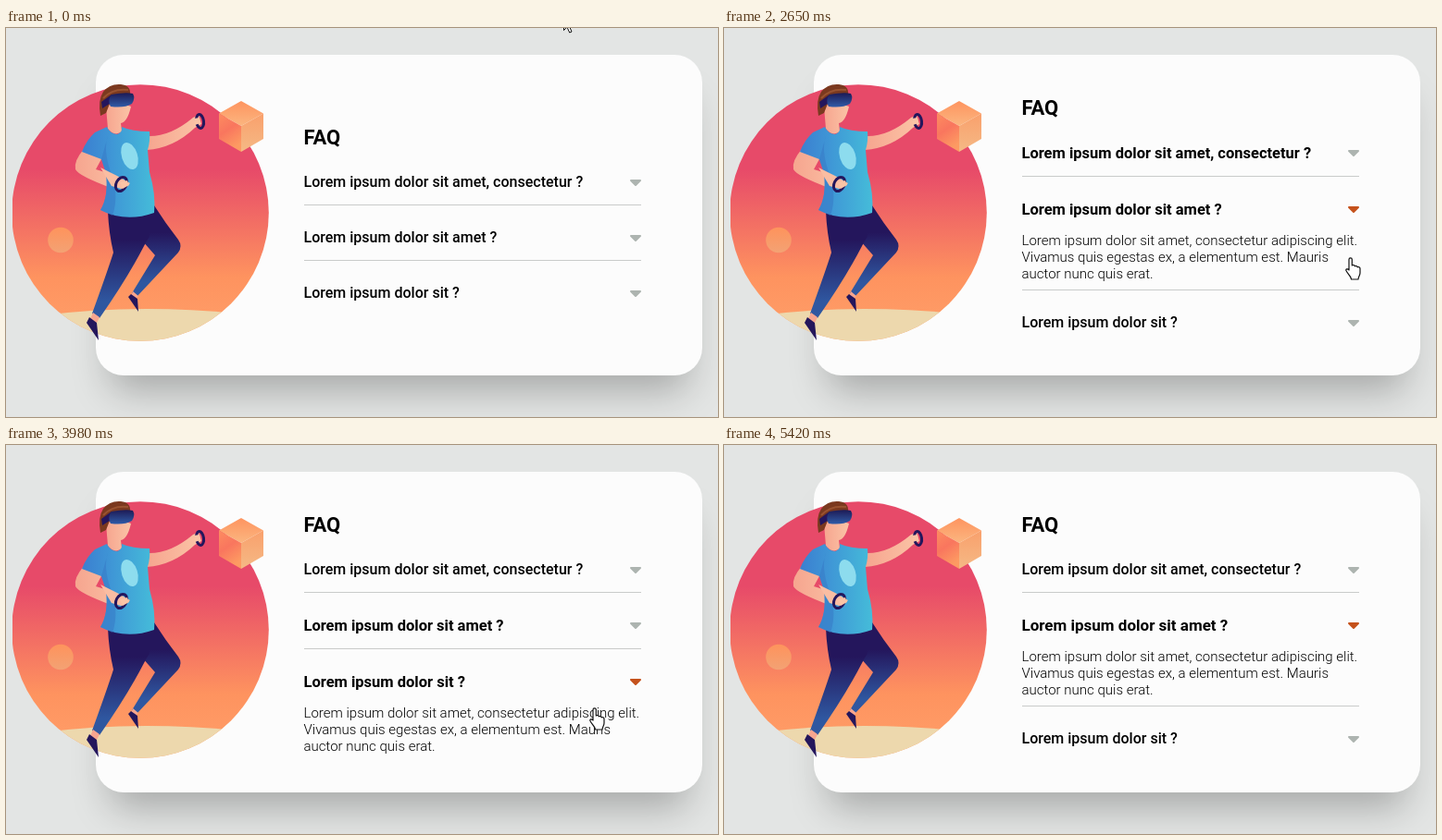
An HTML page that plays this animation: 769 by 421 pixels, repeating every 5620 ms.

```html
<!DOCTYPE html>
<html lang="en">
<head>
<meta charset="utf-8">
<title>FAQ</title>
<style>
  html, body { margin: 0; width: 100%; height: 100%; overflow: hidden; background: #e3e5e4; }
  body { position: relative; }
  .card { position: absolute; left: 97px; top: 29px; width: 655px; height: 347px; border-radius: 30px;
    background: #fcfcfc; box-shadow: 0 32px 42px -16px rgba(0, 0, 0, .27); }
  svg { position: absolute; left: 0; top: 0; display: block; }
  text { font-family: Roboto, "Open Sans", sans-serif; white-space: pre; }
  .title { font-size: 22px; font-weight: 700; }
  .answer { font-size: 15px; font-weight: 300; }
</style>
</head>
<body>
<div class="card"></div>
<svg width="769" height="421" viewBox="0 0 769 421">
  <defs>
    <linearGradient id="sky" x2="0" y2="1">
      <stop offset=".33" stop-color="#e74a69"/><stop offset=".75" stop-color="#fe935f"/><stop offset="1" stop-color="#ffa06a"/>
    </linearGradient>
    <linearGradient id="ball" x2="0" y2="1"><stop stop-color="#fe935c"/><stop offset="1" stop-color="#f3a274"/></linearGradient>
    <linearGradient id="cubeTop" x2="0" y2="1"><stop stop-color="#fe945f"/><stop offset="1" stop-color="#fbb680"/></linearGradient>
    <linearGradient id="cubeLeft" x2=".4" y2="1"><stop stop-color="#fd8c60"/><stop offset=".5" stop-color="#f9765e"/><stop offset="1" stop-color="#fd9a62"/></linearGradient>
    <linearGradient id="cubeRight" x2="0" y2="1"><stop stop-color="#f9a06c"/><stop offset="1" stop-color="#f5b985"/></linearGradient>
    <linearGradient id="shirt"><stop stop-color="#3b7fd0"/><stop offset=".42" stop-color="#3f97d6"/><stop offset="1" stop-color="#45bcd9"/></linearGradient>
    <linearGradient id="pants" x2="0" y2="1"><stop offset=".3" stop-color="#24165c"/><stop offset=".85" stop-color="#2f57a0"/></linearGradient>
    <linearGradient id="visor" x2="0" y2="1"><stop stop-color="#1d1a55"/><stop offset="1" stop-color="#305ca8"/></linearGradient>
    <linearGradient id="skin"><stop stop-color="#f6a58f"/><stop offset="1" stop-color="#fbc4a6"/></linearGradient>
    <clipPath id="left"><path d="M7 50H300V350H7z"/></clipPath>
    <clipPath id="disc"><circle cx="145" cy="200" r="138.800"/></clipPath>
  </defs>

  <g clip-path="url(#left)">
    <circle cx="145" cy="200" r="138.800" fill="url(#sky)"/>
    <path d="M40 311Q140 298 250 309V345H40z" fill="#edd8ad" clip-path="url(#disc)"/>
  </g>
  <circle cx="59" cy="229.500" r="13.800" fill="url(#ball)"/>
  <path d="M254 79L278 92.500L254 106L230 92.500z" fill="url(#cubeTop)"/>
  <path d="M230 92.500L254 106V134L230 120z" fill="url(#cubeLeft)"/>
  <path d="M278 92.500L254 106V134L278 120z" fill="url(#cubeRight)"/>

  <g id="player">
    <path d="M160 192Q172 211 186 229Q191 236 186 243L142 290L136 287L161 246L140 222z" fill="url(#pants)"/>
    <path d="M110 198L161 193Q161 218 149 236Q131 271 101 314L93 309Q110 262 116 243Q111 222 110 198z" fill="url(#pants)"/>
    <path d="M94 308L101 313L98 319L91 315zM137 285L143 290L139 294L135 290z" fill="#f6a58f"/>
    <path d="M90 313L98 319L100 338L87 319zM135 288L142 293L143 307L132 291z" fill="#24165c"/>
    <path d="M153 117Q177 118 202 97L208 94L211 104L204 108Q181 130 152 132z" fill="url(#skin)"/>
    <path d="M84 131Q73 144 75 153Q78 160 116 174L128 175L134 168L126 162L97 153L104 140z" fill="url(#skin)"/>
    <path d="M108 85L110 109Q117 118 125 112L124 103Q131 102 135 85L116 78z" fill="url(#skin)"/>
    <path d="M102 95Q99 78 105 69Q112 60 124 61Q135 62 134 72L114 77L108 92z" fill="#7b391f"/>
    <path d="M105 76Q115 65 132 67" fill="none" stroke="#9a5330" stroke-width="2"/>
    <path d="M103 80L114 72L115 80L104 87z" fill="#24165c"/>
    <path d="M114 72Q130 69 137 71Q140 76 136 82Q128 87 113 85Q109 78 114 72z" fill="url(#visor)"/>
    <path d="M109 107L96 113Q87 121 82 134L103 142L108 157Q111 182 102 197Q129 211 160 200Q162 180 155 156L153 132Q156 122 155 112Q136 112 125 107Q126 113 120 115Q112 114 109 107z" fill="url(#shirt)"/>
    <path d="M110 117Q105 130 112 153Q123 180 115 203L102 197Q111 182 108 157L103 142z" fill="#377ac7" opacity=".55"/>
    <ellipse cx="133.500" cy="138.500" rx="8.500" ry="15" transform="rotate(-18 133.500 138.500)" fill="#8ddcee"/>
    <path d="M102 151L120 160L134 168L128 175L114 171z" fill="#fabda2"/>
    <g fill="none" stroke="#24165c" stroke-width="3">
      <ellipse cx="124.500" cy="169" rx="5.500" ry="8" transform="rotate(28 124.500 169)"/>
      <ellipse cx="209.500" cy="101" rx="4" ry="7.500" transform="rotate(-8 209.500 101)"/>
    </g>
    <path d="M123 167l8-2l2 5l-7 4zM203 98l6-1l1 6l-6 2z" fill="#fbc4a6"/>
  </g>

  <g id="faq"></g>
  <g id="cursor" fill="#fff" stroke="#111" stroke-linejoin="round">
    <path id="pointer" d="M.5 .5V16.500L4 13L6.700 19L9 18L6.400 12H11.500z"/>
    <path id="hand" stroke-width="1.200" d="M4 14V2.500a1.600 1.600 0 0 1 3.300 0V9c1-.9 3-.5 3 .8c1-.6 2.800-.2 2.800 1c1-.6 2.900 0 2.900 1.600V17c0 3-2 4-2 7H6.500c0-3-4-6-5.600-9.500c-.5-1.800 1.600-2.500 3.100-.5z"/>
  </g>
</svg>
<script>
const LOOP = 5620, LEFT = 321.5, GROW = 500;
const GREY = '#adb4b0', CORAL = '#f47b58', RUST = '#c5521c';
const QUESTIONS = ['Lorem ipsum dolor sit amet, consectetur ?', 'Lorem ipsum dolor sit amet ?', 'Lorem ipsum dolor sit ?'];
const ANSWER = ['Lorem ipsum dolor sit amet, consectetur adipiscing elit.',
  'Vivamus quis egestas ex, a elementum est. Mauris', 'auctor nunc quis erat.'];

const CLICKS = [
  { at: 1030, item: 0, fades: true }, { at: 2400, item: 1, fades: true },
  { at: 3730, item: 2 }, { at: 4800, item: 1 }
];
const HOVERS = [{ item: 2, from: 3490, to: 3800 }, { item: 1, from: 4300, to: 4800 }];
const MOVES = [
  { from: 19, to: 20, x: 594, y: 52 },
  { from: 190, to: 630, x: 679, y: 182 },
  { from: 1470, to: 1880, x: 668, y: 212 },
  { from: 2030, to: 2240, x: 671, y: 248 },
  { from: 2950, to: 3490, x: 643, y: 305 },
  { from: 3700, to: 3730, x: 643, y: 317 },
  { from: 3780, to: 4370, x: 593, y: 194 },
  { from: 4850, to: 5400, x: 575, y: -22 }
];

const byId = id => document.getElementById(id);
const set = (node, attrs) => { for (const key in attrs) node.setAttribute(key, attrs[key]); };
const show = (node, on) => set(node, { visibility: on ? 'visible' : 'hidden' });
const ramp = (t, from, to) => Math.min(1, Math.max(0, (t - from) / (to - from)));
const smooth = p => p * p * (3 - 2 * p);
const lerp = (a, b, p) => a + (b - a) * p;

function el(name, attrs, parent) {
  const node = document.createElementNS('http://www.w3.org/2000/svg', name);
  set(node, attrs);
  return parent.appendChild(node);
}

function mix(from, to, p) {
  const channel = (hex, k) => parseInt(hex.slice(1 + 2 * k, 3 + 2 * k), 16);
  return `rgb(${[0, 1, 2].map(k => Math.round(lerp(channel(from, k), channel(to, k), p)))})`;
}

const faq = byId('faq'), cursor = byId('cursor'), pointer = byId('pointer'), hand = byId('hand');
const title = el('text', { class: 'title', x: LEFT }, faq);
title.textContent = 'FAQ';
const items = QUESTIONS.map((words, i) => {
  const label = el('text', { x: LEFT }, faq);
  label.textContent = words;
  const arrow = el('path', { d: 'M-5 -2.500H5L0 2.500z', 'stroke-width': 2, 'stroke-linejoin': 'round' }, faq);
  const line = i < 2 && el('rect', { x: 322, width: 364, height: 1, fill: '#c9cbca' }, faq);
  return { label, arrow, line };
});
const answer = el('g', { class: 'answer' }, faq);
ANSWER.forEach((words, i) => { el('text', { x: LEFT, y: i * 18 }, answer).textContent = words; });

// The opened question grows while the one opened before it shrinks back.
function growthOf(i, t, latest) {
  const click = CLICKS[latest], previous = CLICKS[latest - 1];
  const p = click ? smooth(ramp(t, click.at, click.at + GROW)) : 0;
  if (click && click.item === i) return p;
  return previous && previous.item === i ? 1 - p : 0;
}

function labelColor(i, t) {
  const hover = HOVERS.find(h => h.item === i && t >= h.from && t < h.to);
  return hover ? mix('#000000', CORAL, ramp(t, hover.from, hover.from + 60)) : '#000';
}

function draw(t) {
  const latest = CLICKS.filter(click => click.at <= t).length - 1;
  const click = CLICKS[latest];
  const age = click ? t - click.at : 0;
  let y = click ? 134 : 166;

  set(title, { y: y - 40 });
  items.forEach(({ label, arrow, line }, i) => {
    const open = click && click.item === i;
    const growth = growthOf(i, t, latest), bold = growth > .3;
    const color = open ? mix(CORAL, RUST, ramp(age, 40, 240)) : GREY;
    set(arrow, { transform: `translate(680 ${y + 1.5})`, fill: color, stroke: color,
      opacity: open && click.fades ? 1 - ramp(age, 550, 850) : 1 });
    if (bold) y += 1;
    set(label, { y: y + 6, fill: labelColor(i, t), 'font-size': 16 + growth, 'font-weight': bold ? 700 : 500 });
    if (open) {
      set(answer, { transform: `translate(0 ${y + 39})` });
      y += 62;
    }
    if (line) set(line, { y: y + 25 });
    y += 60;
  });
  show(answer, click);

  const spot = MOVES.reduce((at, move) => {
    const p = smooth(ramp(t, move.from, move.to));
    return { x: lerp(at.x, move.x, p), y: lerp(at.y, move.y, p) };
  }, { x: 602, y: -14 });
  const overFaq = t > 540 && t < 4960;
  set(cursor, { transform: `translate(${Math.round(spot.x)} ${Math.round(spot.y)})` });
  show(pointer, !overFaq);
  show(hand, overFaq);
}

const start = performance.now();
function tick() {
  draw((performance.now() - start) % LOOP);
  requestAnimationFrame(tick);
}
tick();
</script>
</body>
</html>
```
